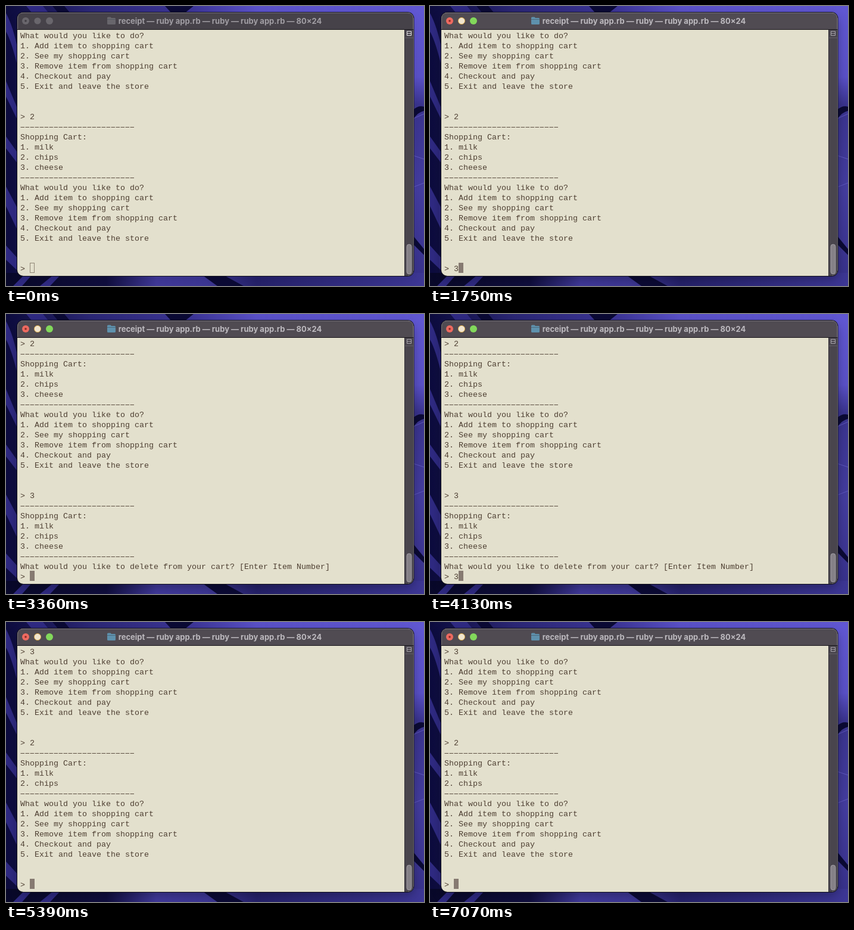
Animation of 702 by 470 pixels, one loop 7140 ms. Source, as an HTML page:

```html
<!DOCTYPE html>
<html lang="en">
<head>
<meta charset="utf-8">
<title>Shopping cart in a terminal</title>
<style>
  html, body { margin: 0; width: 100%; height: 100%; overflow: hidden; background: #0b0a35; }
  svg { display: block; width: 702px; height: 470px; }
  #title { font: 700 13px Inter, "Open Sans", sans-serif; text-anchor: middle; fill: #bdbabf; }
  #screen text { font: 13.333px "Liberation Mono", "Courier New", monospace; white-space: pre; fill: #4e3f32; }
  #screen path { stroke: #5c4e41; stroke-dasharray: 6.500 1.500; }
  .idle #title { fill: #a19ea4; }
  .idle .light { fill: #69666c; stroke: none; }
  .idle #folder { fill: #68666c; }
  .idle #dot { fill: #403d43; }
  .idle #bar { fill: #464249; }
  .idle #split { stroke: #e8e6ea; }
  .idle #shadow { opacity: .1; }
</style>
</head>
<body>
<svg id="stage" viewBox="0 0 702 470">
  <defs>
    <linearGradient id="top">
      <stop offset="0" stop-color="#0c0b3d"/>
      <stop offset=".2" stop-color="#2b2775"/>
      <stop offset=".45" stop-color="#3d3698"/>
      <stop offset=".6" stop-color="#5a51c8"/>
      <stop offset="1" stop-color="#6057d2"/>
    </linearGradient>
    <linearGradient id="right" x2="0" y2="1">
      <stop offset="0" stop-color="#6057d2"/>
      <stop offset=".24" stop-color="#5a51c8"/>
      <stop offset=".34" stop-color="#3a348f"/>
      <stop offset=".65" stop-color="#443da0"/>
      <stop offset="1" stop-color="#37318a"/>
    </linearGradient>
    <linearGradient id="low">
      <stop offset="0" stop-color="#080829"/>
      <stop offset=".24" stop-color="#100e3e"/>
      <stop offset=".36" stop-color="#40399a"/>
      <stop offset=".48" stop-color="#3d3795"/>
      <stop offset=".6" stop-color="#25216a"/>
      <stop offset="1" stop-color="#3d3795"/>
    </linearGradient>
    <clipPath id="frame"><rect x="19" y="11" width="665.5" height="442" rx="10"/></clipPath>
    <filter id="blur" x="-10%" y="-10%" width="120%" height="120%"><feGaussianBlur stdDeviation="9"/></filter>
  </defs>

  <!-- Wallpaper -->
  <rect width="702" height="470" fill="url(#top)"/>
  <rect x="680" y="8" width="22" height="462" fill="url(#right)"/>
  <rect y="448" width="702" height="22" fill="url(#low)"/>
  <g fill="#2f2a83">
    <path d="M0 12Q12 34 20 74V104Q9 58 0 43ZM0 126L20 174V193L0 152ZM0 219L20 247V265L0 239ZM0 303L20 341V378L0 336ZM0 402L20 424V445L0 426Z"/>
    <path d="M34 0H62L72 12H44ZM12 470L30 452H43L27 470ZM57 470L79 452H91L74 470Z"/>
  </g>
  <g fill="#0b0a35">
    <path d="M78 0H98L108 12H88ZM267 0H315L300 12H278Z"/>
    <path d="M330 452H366L399 470H355Z"/>
    <path d="M684 174Q693 166 702 169V176Q692 178 684 190ZM684 386L702 408V418L684 400Z"/>
  </g>
  <path d="M684 189L702 181M684 251L702 257M684 304L702 297" stroke="#5f57c0" fill="none"/>

  <!-- Window -->
  <rect id="shadow" x="18" y="18" width="667" height="440" rx="10" opacity=".3" filter="url(#blur)"/>
  <rect x="18" y="10" width="667.5" height="444" rx="11" fill="#11101b"/>
  <g clip-path="url(#frame)">
    <rect x="19" y="11" width="666" height="442" fill="#e3e0cd"/>
    <rect id="bar" x="19" y="11" width="666" height="28" fill="#504b52"/>
    <path d="M19 39.5H685" stroke="#17151a"/>
    <rect x="669" y="40" width="16" height="413" fill="#49454d"/>
    <path d="M669.5 40V453" stroke="#343138"/>
    <path d="M670 53.5H685" stroke="#615d65"/>
    <path d="M19.500 39V21q0-9.500 9.500-9.500H674q10 0 10 9.500V39" fill="none" stroke="#79747d"/>
  </g>

  <circle class="light" cx="33" cy="25" r="6" fill="#ed6a60"/>
  <circle class="light" cx="53" cy="25" r="5.6" fill="#f0e5ce" stroke="#d8a33a" stroke-width=".9"/>
  <circle class="light" cx="73" cy="25" r="6" fill="#82d85b"/>
  <circle id="dot" cx="33" cy="25" r="1.8" fill="#8e2924"/>
  <path id="folder" d="M170 20q0-1.500 1.500-1.500h4l1.500 1.500h5.500q1.500 0 1.500 1.500v8q0 1.500-1.500 1.500h-11q-1.500 0-1.500-1.500Z" fill="#5e91ad"/>
  <path d="M170 22.500H184" stroke="#414d58" stroke-opacity=".55"/>
  <text id="title" x="359.500" y="29.500">receipt — ruby app.rb — ruby — ruby app.rb — 80×24</text>
  <path id="split" d="M673.5 42.5h7v7h-7ZM674 46h6" fill="none" stroke="#aaa7ae"/>
  <rect id="thumb" x="673" width="8" rx="4" fill="#858187" stroke="#aaa6ad" stroke-width=".8"/>

  <g id="screen"></g>
  <rect id="cursor"/>
</svg>
<script>
const LOOP = 7140, STEP = 70, ROWS = 24, CHAR = 8, LINE = 17, LEFT = 24;
const FOCUS_AT = 70, CURSOR_FOCUS_AT = 980;
const SVG = "http://www.w3.org/2000/svg";
const byId = id => document.getElementById(id);
const setAll = (node, attrs) => Object.entries(attrs).forEach(([name, value]) => node.setAttribute(name, value));

const rule = "-".repeat(24);
const menu = `What would you like to do?
1. Add item to shopping cart
2. See my shopping cart
3. Remove item from shopping cart
4. Checkout and pay
5. Exit and leave the store


> `;
const cart = (...items) =>
  [rule, "Shopping Cart:", ...items.map((item, i) => `${i + 1}. ${item}`), rule, ""].join("\n");

// Each entry appends text to the terminal and sets the scrollbar position.
const session = [
  { at: 0, text: menu + "2\n" + cart("milk", "chips", "cheese") + menu, thumb: 400 },
  { at: 1610, text: "3", thumb: 400 },
  { at: 2100, text: "\n" + cart("milk", "chips", "cheese") +
      "What would you like to delete from your cart? [Enter Item Number]\n> ", thumb: 402 },
  { at: 3850, text: "3", thumb: 402 },
  { at: 4340, text: "\n" + menu, thumb: 405 },
  { at: 4760, text: "2", thumb: 405 },
  { at: 5110, text: "\n" + cart("milk", "chips") + menu, thumb: 408 }
];

function drawLine(line, row) {
  const isRule = line === rule;
  const node = document.createElementNS(SVG, isRule ? "path" : "text");
  if (isRule) {
    setAll(node, { d: `M${LEFT + .5} ${50.5 + row * LINE}h${rule.length * CHAR - 1}` });
  } else {
    setAll(node, { x: LEFT, y: 54 + row * LINE });
    node.textContent = line;
  }
  return node;
}

function drawScreen(shown) {
  const lines = shown.map(entry => entry.text).join("").split("\n").slice(-ROWS);
  byId("screen").replaceChildren(...lines.map(drawLine));
  const top = shown[shown.length - 1].thumb;
  setAll(byId("thumb"), { y: top, height: 450 - top });
  return LEFT + lines[lines.length - 1].length * CHAR;
}

function drawCursor(x, solid) {
  setAll(byId("cursor"), solid
    ? { x, y: 431, width: 8, height: 17, fill: "#867a71", stroke: "none" }
    : { x: x + .5, y: 431.5, width: 7, height: 16, fill: "none", stroke: "#908777" });
}

let shownCount = 0, cursorX = 0;
function render(now) {
  const time = Math.floor(now % LOOP / STEP) * STEP;
  const shown = session.filter(entry => entry.at <= time);
  if (shown.length !== shownCount) {
    cursorX = drawScreen(shown);
    shownCount = shown.length;
  }
  drawCursor(cursorX, time >= CURSOR_FOCUS_AT);
  byId("stage").classList.toggle("idle", time < FOCUS_AT);
}

const start = performance.now();
function tick() {
  render(performance.now() - start);
  requestAnimationFrame(tick);
}
tick();
</script>
</body>
</html>
```
